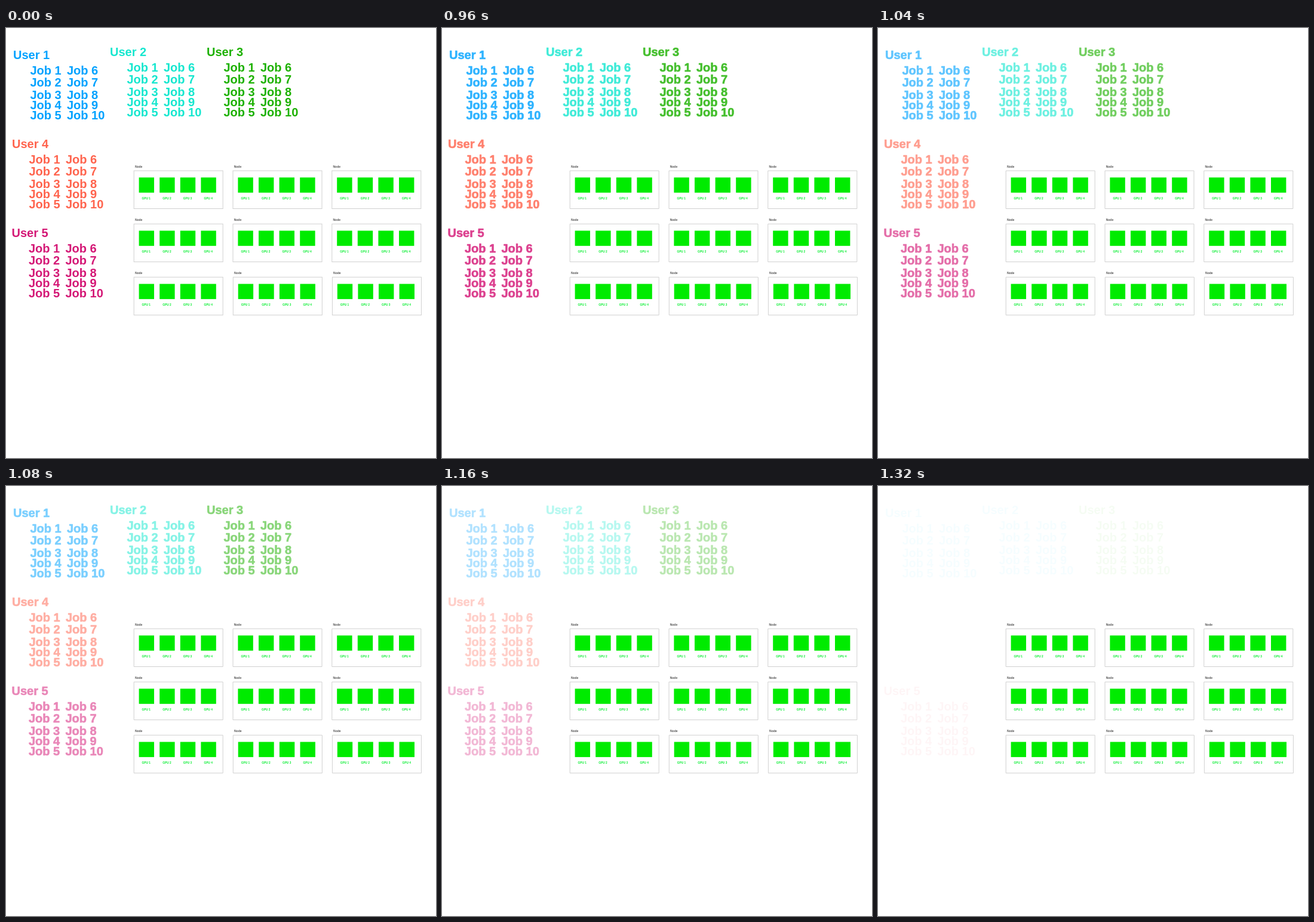
Animation, 720 px wide and 720 px high, one loop 2.72 s. Source, as an HTML page with a canvas:

```html
<!DOCTYPE html>
<html lang="en">
<head>
<meta charset="utf-8">
<title>Job queue and GPU nodes</title>
<style>
html, body { margin: 0; width: 100%; height: 100%; overflow: hidden; background: #fff; }
canvas { display: block; width: 720px; height: 720px; }
</style>
</head>
<body>
<canvas id="stage" width="720" height="720"></canvas>
<script>
const ctx = document.getElementById('stage').getContext('2d');
const FONT = '"Liberation Sans", Arial, sans-serif';
const LOOP = 2720, FADE_START = 800, FADE_END = 1320, FADE_SPAN = 575, STEP = 40;
const ROWS = [26, 46, 67, 84, 101];

// rest: faint colour left after the fade, if any
const users = [
  { x: 12, y: 52, color: '#00a2ff', rest: '#f5fdff' },
  { x: 174, y: 47, color: '#16e7cf', rest: '#f5fdff' },
  { x: 336, y: 47, color: '#1db100', rest: '#f5fcf3' },
  { x: 10, y: 201, color: '#ff644e', rest: null },
  { x: 9.5, y: 350, color: '#d41876', rest: '#fef5f6' }
];

function text(str, x, y, size, color, edge = 0) {
  ctx.font = `bold ${size}px ${FONT}`;
  ctx.fillStyle = ctx.strokeStyle = color;
  ctx.fillText(str, x, y);
  if (edge) {
    ctx.lineWidth = edge;
    ctx.lineJoin = 'round';
    ctx.strokeText(str, x, y);
  }
}

// Opaque tint towards white, so outline and fill do not add up
function tint(hex, alpha) {
  const parts = [1, 3, 5].map(i => {
    const v = parseInt(hex.slice(i, i + 2), 16);
    return Math.round(255 + (v - 255) * alpha);
  });
  return `rgb(${parts.join(',')})`;
}

function drawUser(user, index, color, edge) {
  const { x, y } = user;
  text(`User ${index + 1}`, x, y, 20, color, edge);
  ROWS.forEach((dy, i) => {
    text(`Job ${i + 1}`, x + 28.5, y + dy, 20, color, edge);
    text(`Job ${i + 6}`, x + 90, y + dy, 20, color, edge);
  });
}

function drawNode(x, y) {
  text('Node', x + 2, y - 5.3, 5, '#555');
  ctx.strokeStyle = '#d0d0d0';
  ctx.lineWidth = 1;
  ctx.strokeRect(x + 0.3, y, 149, 63.5);
  for (let i = 0; i < 4; i++) {
    const gx = x + 8.7 + i * 34.6;
    ctx.fillStyle = '#00eb00';
    ctx.fillRect(gx, y + 11.3, 25.4, 25.4);
    text(`GPU ${i + 1}`, gx + 5, y + 48, 4.8, '#00ee2c');
  }
}

function draw(time) {
  const t = time % LOOP;
  ctx.fillStyle = '#fff';
  ctx.fillRect(0, 0, 720, 720);

  const fading = t >= FADE_START;
  const step = Math.floor((t - FADE_START) / STEP) * STEP;
  const alpha = fading ? (1 + Math.cos(Math.PI * step / FADE_SPAN)) / 2 : 1;
  users.forEach((user, i) => {
    const color = t >= FADE_END ? user.rest : tint(user.color, alpha);
    if (color) drawUser(user, i, color, fading && t < FADE_END ? 0.6 : 0);
  });

  for (let row = 0; row < 3; row++) {
    for (let col = 0; col < 3; col++) {
      const nudge = row === 2 ? col * 0.3 : 0;
      drawNode(213.9 + col * 165.8 + nudge, 239 + row * 89.1);
    }
  }
}

const start = performance.now();
function tick() {
  draw(performance.now() - start);
  requestAnimationFrame(tick);
}
tick();
</script>
</body>
</html>
```
